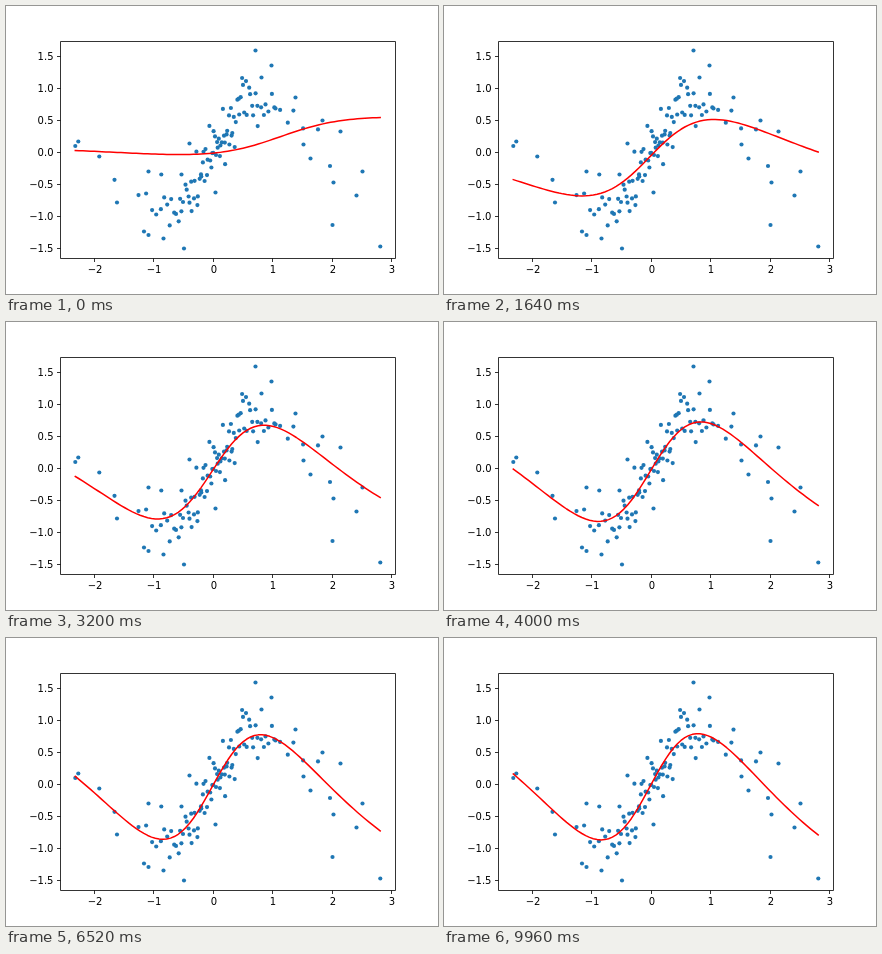
Animation, 432 px wide and 288 px high, one loop 10 s. Source, as an HTML page:

```html
<!DOCTYPE html>
<html lang="en">
<head>
<meta charset="utf-8">
<title>Curve fit</title>
<style>
html, body { margin: 0; width: 100%; height: 100%; overflow: hidden; background: #fff; }
svg { display: block; width: 432px; height: 288px; }
text { font: 10px "DejaVu Sans", sans-serif; fill: #000; }
.axis { fill: none; stroke: #000; stroke-width: .8; }
.dots { fill: #1f77b4; }
.fit { fill: none; stroke: #f00; stroke-width: 1.5; stroke-linejoin: round; stroke-linecap: square; }
</style>
</head>
<body>
<svg viewBox="0 0 432 288">
  <g class="dots" id="dots"></g>
  <path class="fit" id="fit"/>
  <g id="axes"><path class="axis" d="M54.5 35.5H389.5V252.5H54.5Z"/></g>
</svg>
<script>
const LOOP = 10000, STEP = 40;
const X_MIN = -2.327, X_MAX = 2.806, CROWD = 92;
const byId = id => document.getElementById(id);
const px = x => 207.5 + 59.4 * x;
const py = y => 146.3 - 64 * y;

function add(parent, tag, attrs, label) {
  const el = document.createElementNS("http://www.w3.org/2000/svg", tag);
  for (const key in attrs) el.setAttribute(key, attrs[key]);
  if (label) el.textContent = label;
  parent.appendChild(el);
}

// The model: a steep rise against a wide fall
const model = (p, x) =>
  p.c + p.a * Math.tanh(p.k * (x - p.m)) - p.b * Math.tanh((x - p.n) / 3);

const poses = [
  { t: 0, c: .313, a: .43, k: .9, m: 1.1, b: .22, n: 0 },
  { t: 880, c: -.045, a: 1.61, k: .7, m: .04, b: 1.55, n: 0 },
  { t: 2440, c: -.262, a: 1.954, k: 1.1, m: -.03, b: 2.804, n: .2 },
  { t: 4000, c: -.23, a: 2.49, k: 1.15, m: -.015, b: 3.977, n: .13 },
  { t: 5200, c: -.205, a: 2.597, k: 1.18, m: -.015, b: 4.274, n: .107 },
  { t: 8160, c: -.21, a: 2.679, k: 1.2, m: -.02, b: 4.497, n: .1 },
  { t: 9960, c: -.215, a: 2.718, k: 1.2, m: -.02, b: 4.589, n: .104 }
];

// Learning slows down, so the poses are blended in log time
const pace = t => Math.log(1 + t / 600);
const times = poses.map(p => pace(p.t));

// Smooth cubic through uneven knots
function spline(xs, ys, x) {
  const last = xs.length - 1;
  const slope = i => (ys[i + 1] - ys[i]) / (xs[i + 1] - xs[i]);
  const tangent = i => {
    if (i === 0) return slope(0);
    if (i === last) return slope(last - 1);
    const a = xs[i] - xs[i - 1], b = xs[i + 1] - xs[i];
    return (slope(i - 1) * b + slope(i) * a) / (a + b);
  };
  let i = 0;
  while (i < last - 1 && x > xs[i + 1]) i++;
  const h = xs[i + 1] - xs[i], s = (x - xs[i]) / h, r = 1 - s;
  return r * r * (1 + 2 * s) * ys[i] + s * s * (3 - 2 * s) * ys[i + 1]
    + h * s * r * (r * tangent(i) - s * tangent(i + 1));
}

let seed = 7;
function random() {
  seed = (seed * 16807) % 2147483647;
  return seed / 2147483647;
}
const noise = () => random() + random() + random() - 1.5;

const addDot = (cx, cy) => add(byId("dots"), "circle", { cx, cy, r: 2.08 });

// Dots that stand apart
[
  [69.3, 140], [72.3, 135.5], [93.3, 150.5], [111, 196.5], [138, 225.5], [142.5, 229],
  [142.5, 165.5], [155.3, 168.5], [157.5, 232.5], [175.5, 168.5], [178, 242.5],
  [183.5, 137.5], [209.5, 186.5], [249.5, 44.5], [255.5, 71.5], [265.5, 59.5],
  [289.5, 91.5], [297.5, 138.5], [304.5, 152.5], [316.5, 114.5], [324, 160],
  [326.5, 219], [327.5, 176.5], [334.5, 125.5], [350.5, 189.5], [356.5, 165.5],
  [374.3, 240.5]
].forEach(([x, y]) => addDot(x, y));

// The crowd gathers round the learned curve, densest in the middle
const learned = poses[poses.length - 1];
for (let i = 0; i < CROWD; i++) {
  const u = (i + random()) / CROWD * .98 + .01;
  const x = .08 + .38 * Math.log(u / (1 - u));
  addDot(px(x).toFixed(1), py(model(learned, x) + .4 * noise()).toFixed(1));
}

const axes = byId("axes");
const sign = s => s.replace("-", "\u2212");
for (let n = -2; n <= 3; n++) {
  const x = Math.floor(207.3 + 59.4 * n) + .5;
  add(axes, "path", { class: "axis", d: `M${x} 252.5v3.5` });
  add(axes, "text", { x: x + .5, y: 267, "text-anchor": "middle" }, sign(String(n)));
}
for (let n = -3; n <= 3; n++) {
  const y = 146.5 - 32 * n;
  add(axes, "path", { class: "axis", d: `M54.5 ${y}h-3.5` });
  add(axes, "text", { x: 47.5, y: y + 3.5, "text-anchor": "end" }, sign((n / 2).toFixed(1)));
}

function draw(ms) {
  const now = pace(Math.floor((ms % LOOP) / STEP) * STEP);
  const points = [];
  for (let i = 0; i <= 80; i++) {
    const x = X_MIN + (X_MAX - X_MIN) * i / 80;
    const y = spline(times, poses.map(p => model(p, x)), now);
    points.push(`${px(x).toFixed(2)} ${py(y).toFixed(2)}`);
  }
  byId("fit").setAttribute("d", "M" + points.join("L"));
}

const start = performance.now();
function tick() {
  draw(performance.now() - start);
  requestAnimationFrame(tick);
}
tick();
</script>
</body>
</html>
```
